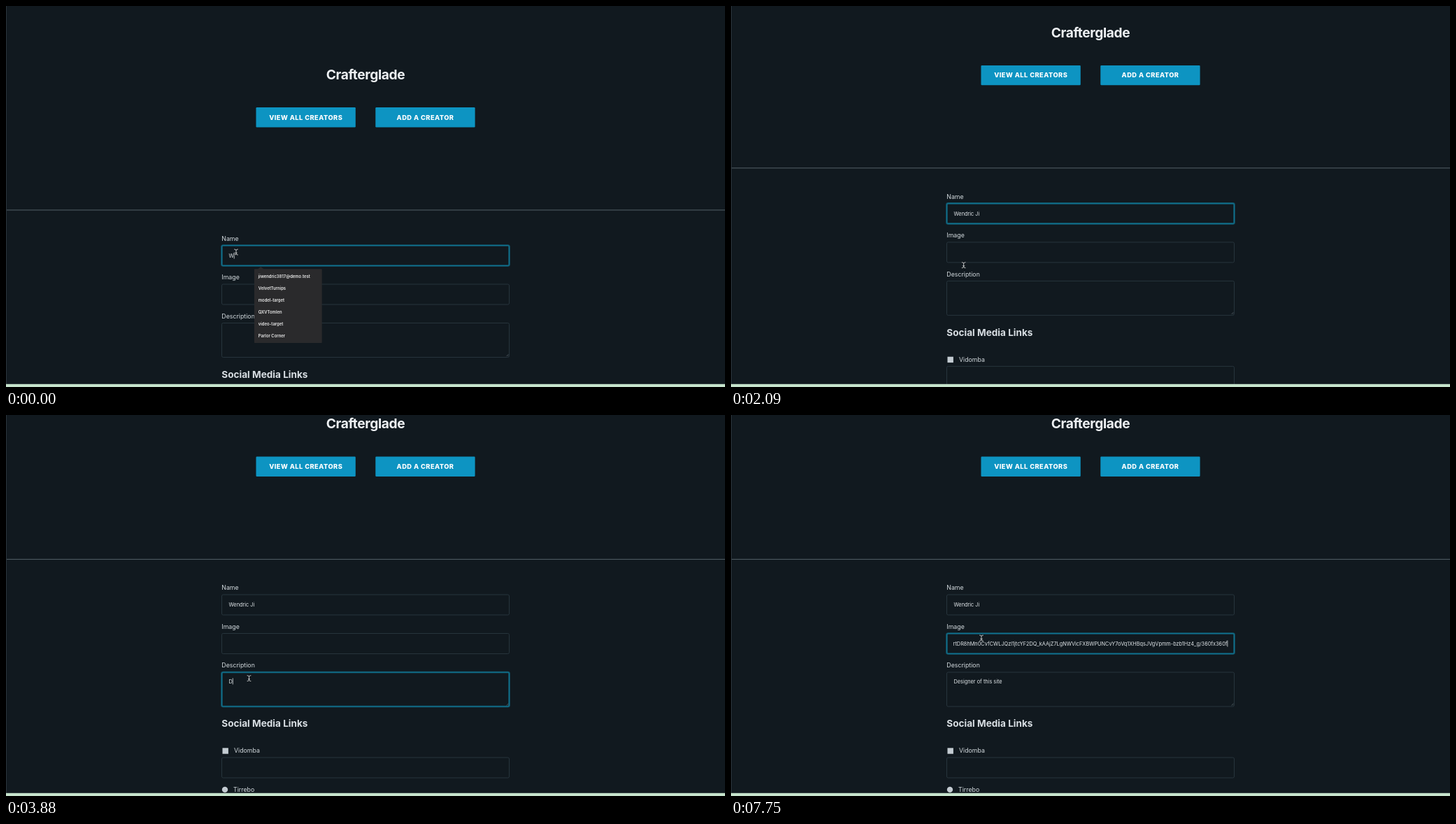
An HTML page for the animation above (8 s loop, 1028x545 px).

```html
<!DOCTYPE html>
<html lang="en">
<head>
<meta charset="utf-8">
<title>Add a creator</title>
<style>
  html, body { margin: 0; width: 100%; height: 100%; overflow: hidden; background: #11191f; }
  svg { display: block; width: 100vw; height: 100vh; }
  text { font-family: Inter, "Open Sans", sans-serif; white-space: pre; }
  .title { font-size: 19.2px; font-weight: 700; letter-spacing: -.4px; fill: #edf0f3; text-anchor: middle; }
  .button { font-size: 9.3px; font-weight: 800; letter-spacing: .44px; fill: #fff; text-anchor: middle; }
  .label { font-size: 8.8px; fill: #d3dade; }
  .heading { font-size: 13.6px; font-weight: 700; fill: #d8dee3; }
  .value { font-size: 7.35px; fill: #e2e7ea; }
  .option { font-size: 5.9px; font-weight: 600; fill: #ececec; }
</style>
</head>
<body>
<svg id="stage" viewBox="0 0 1028 545" preserveAspectRatio="none">
  <defs><clipPath id="inner"><rect x="318" y="300" width="392.5" height="300"/></clipPath></defs>
  <rect width="1028" height="545" fill="#11191f"/>
  <g id="page"></g>
  <g id="popup"></g>
  <g id="pointer" fill="none" stroke-linecap="round"></g>
  <rect width="1" height="541" fill="#29333a"/>
  <rect y="540.8" width="1028" height="4.2" fill="#c6e4cc"/>
</svg>
<script>
const LOOP = 8000;
const FRAME = 149.04;
const BLINK = 500 / FRAME;
const LEFT = 318.5, RIGHT = 709.5, ROW = 55.5;
const $ = id => document.getElementById(id);
const page = $("page"), popup = $("popup"), pointer = $("pointer");

function set(el, attrs) {
  for (const key in attrs) el.setAttribute(key, attrs[key]);
}

function add(parent, tag, attrs, text = "") {
  const el = document.createElementNS("http://www.w3.org/2000/svg", tag);
  set(el, attrs);
  el.textContent = text;
  return parent.appendChild(el);
}

const write = (cls, x, y, text, parent = page) => add(parent, "text", { class: cls, x, y }, text);
const clamp = v => Math.max(0, Math.min(1, v));

// Linear path through a few [time, ...values] points
function along(points, n) {
  const i = points.findIndex(p => p[0] > n);
  if (i === 0) return points[0].slice(1);
  if (i < 0) return points[points.length - 1].slice(1);
  const [a, b] = [points[i - 1], points[i]];
  const k = (n - a[0]) / (b[0] - a[0]);
  return a.slice(1).map((v, j) => v + (b[j + 1] - v) * k);
}

// Header
write("title", 514, 104.8, "Crafterglade");
[[357.5, "VIEW ALL CREATORS"], [528.3, "ADD A CREATOR"]].forEach(([x, text]) => {
  add(page, "rect", { x, y: 145, width: 142.3, height: 28.4, rx: 1.2, fill: "#0d94c2" });
  write("button", x + 71.2, 162.5, text);
});
add(page, "rect", { y: 291.4, width: 1028, height: 1, fill: "#536067" });

// Form: times are counted in held pictures
function field(y, label, spec, height = 29, labelX = 308.3) {
  const shape = { x: 308.5, y, width: 411, height, rx: 2, fill: "none" };
  write("label", labelX, y - 6.6, label);
  const glow = add(page, "rect", { ...shape, stroke: "#11566c", "stroke-width": 2.6 });
  const box = add(page, "rect", { ...shape, "stroke-width": 1 });
  const baseline = y + (height > 29 ? 15.6 : 17.2);
  const text = write("value", LEFT, baseline, "", add(page, "g", { "clip-path": "url(#inner)" }));
  return { glow, box, text, baseline, ...spec };
}

const top0 = 342.5, links = 575.5;
const fields = [
  field(top0, "Name", {
    open: -9, close: 20, content: "Wendric Ji", keys: [[0, 1], [5, 8], [6, 8], [8, 10]]
  }),
  field(top0 + 2 * ROW, "Description", {
    open: 20, close: 43, content: "Designer of this site", keys: [[25, 0], [32, 11], [34, 17], [38, 21]]
  }, 49),
  field(top0 + ROW, "Image", {
    open: 43, close: 99, keys: [[44, 0], [45, 99]],
    content: "rtDR8hMn0CvfCWLJQzl1jtcYF2DQ_kAAjZ7LgNWVicFXBWPUNCvY7oVq1XHBqsJVgVpmm-bzb1Hz4_g/360fx360f"
  })
];
const unused = field(links, "Vidomba", {}, 29, 326);
set(unused.box, { stroke: "#27343c" });
unused.glow.remove();
write("label", 325, links + ROW - 6.6, "Tirrebo");
write("heading", 308.3, 531.9, "Social Media Links");
add(page, "rect", { x: 309.5, y: 561.8, width: 8.4, height: 8.4, fill: "#c3cbd1" });
add(page, "circle", { cx: 313, cy: 621.4, r: 4.2, fill: "#c3cbd1" });
add(page, "path", { d: "M715.5 501 l3 -3 M717.3 501 l1.2 -1.2", stroke: "#66727a", "stroke-width": .6 });
const caret = add(page, "rect", { width: .8, height: 9, fill: "#dbe1e5" });

// Autofill list
add(popup, "path", { d: "M359.5 376.8 L364.3 373 L369 376.8 Z", fill: "#2a2a2c" });
add(popup, "rect", { x: 355, y: 376.3, width: 96.7, height: 105.7, rx: .8, fill: "#2a2a2c" });
["jiwendric3817@demo.test", "VelvetTurnips", "model-target", "QXVTomlen", "video-target", "Parlor Corner"]
  .forEach((text, i) => write("option", 360.8, 388.6 + i * 17.1, text, popup));

// Text pointer
const beam = "M-2.5 -4 Q0 -4 0 -2.6 Q0 -4 2.5 -4 M0 -2.6 V2.6 M-2.5 4 Q0 4 0 2.6 Q0 4 2.5 4 M-1.3 1.2 H1.3";
add(pointer, "path", { d: beam, stroke: "#0a0f13", "stroke-width": 1.9 });
add(pointer, "path", { d: beam, stroke: "#d3d7da", "stroke-width": .9 });
const route = [[10, 329, 352], [11, 327, 366], [13, 326, 366.5], [16, 346, 379], [18, 347.5, 376.7],
  [39, 347.5, 376.7], [42, 358, 319]];

const count = (f, n) => Math.floor(along(f.keys, n)[0]);
const owner = n => fields.find(f => n < f.close);
const scroll = n => 85.5 * (1 - Math.exp(-Math.max(0, n * FRAME - 1862) / 185));

// The caret restarts its blink at every key press and click
function caretShown(n) {
  const state = k => owner(k).open * 100 + count(owner(k), k);
  let last = n;
  while (last > 0 && state(last) === state(last - 1)) last--;
  return Math.floor((n - last + .5) / BLINK) % 2 === 0;
}

function drawField(f, n) {
  const focus = clamp((n - f.open + 1) / 2) - clamp((n - f.close + 1) / 2);
  set(f.glow, { opacity: Math.max(0, focus * 2 - 1) });
  set(f.box, { stroke: focus === 1 ? "#10738f" : focus ? "#1b566f" : "#27343c" });

  const value = f.content.slice(0, count(f, n));
  if (f.text.textContent !== value) f.text.textContent = value;
  const width = value ? f.text.getComputedTextLength() : 0;
  const end = Math.min(LEFT + width, RIGHT);
  set(f.text, { x: end - width });
  if (f === owner(n)) set(caret, { x: end, y: f.baseline - 7.2 });
}

function draw(t) {
  const n = Math.floor((t + 6) / FRAME);
  set(page, { transform: `translate(0 ${-scroll(n)})` });
  fields.forEach(f => drawField(f, n));
  set(caret, { opacity: caretShown(n) ? 1 : 0 });
  set(popup, { opacity: n < 1 ? 1 : 0 });
  set(pointer, { transform: `translate(${along(route, n)})` });
}

const begin = performance.now();
function tick() {
  draw((performance.now() - begin) % LOOP);
  requestAnimationFrame(tick);
}
tick();
</script>
</body>
</html>
```
